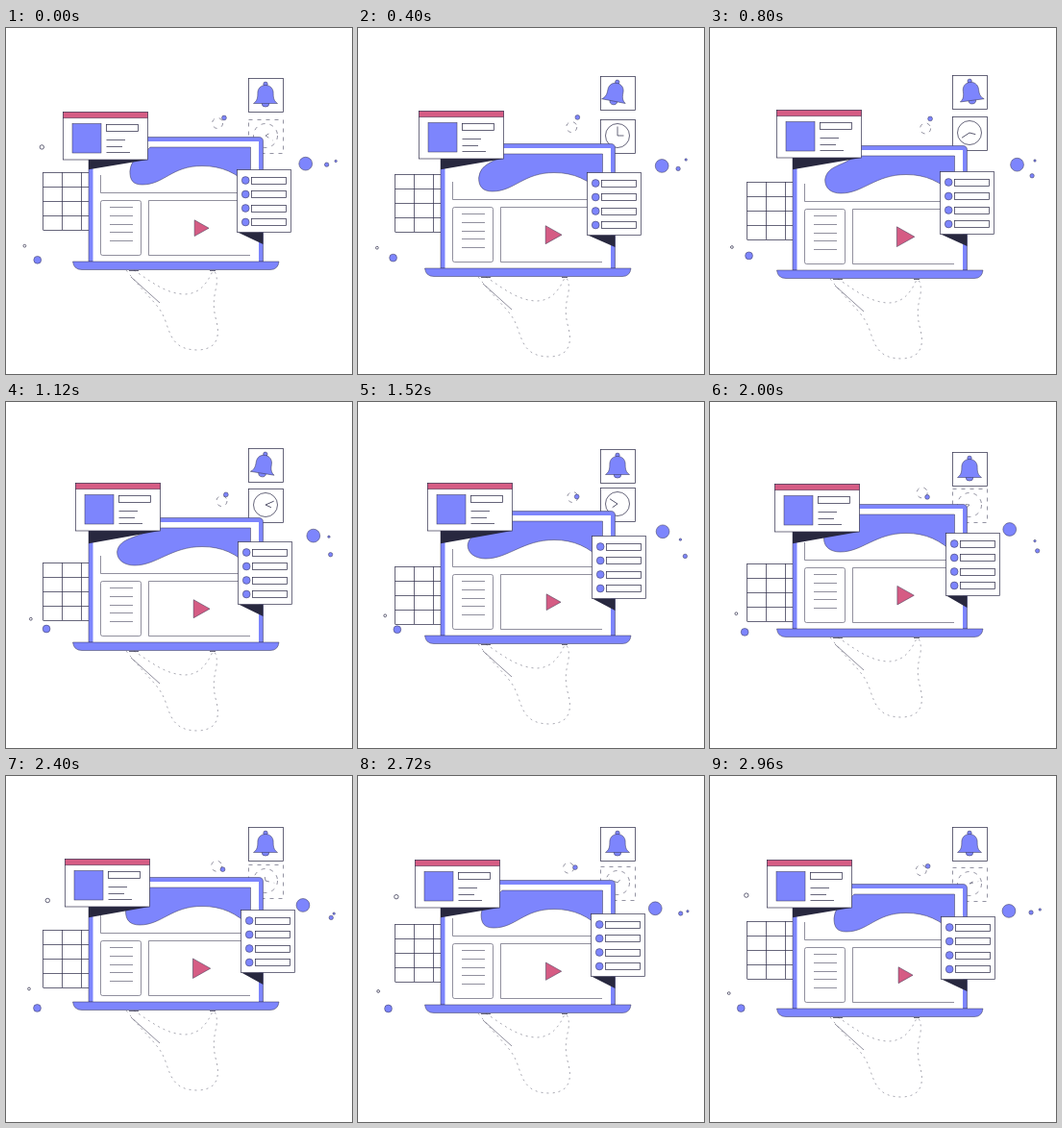
Recreate the animation shown at these times as an HTML page. Size 360 px wide and 360 px high, loop 3040 ms.

```html
<!DOCTYPE html>
<html lang="en">
<head>
<meta charset="utf-8">
<title>Floating laptop</title>
<style>
  html, body { margin: 0; width: 100%; height: 100%; overflow: hidden; background: #fff; }
  svg { display: block; width: 100vw; height: 100vh; }
  .line { fill: none; stroke: #34334f; stroke-width: .75; }
  .panel { fill: #fff; stroke: #34334f; stroke-width: .7; }
  .blue { fill: #7d85fd; stroke: #34334f; stroke-width: .5; }
  .red { fill: #d55c84; stroke: #34334f; stroke-width: .5; }
  .shade { fill: #28283f; }
  .page { stroke: #55546a; stroke-width: .65; }
  .sketch { stroke: #33334a; stroke-width: .65; stroke-dasharray: 2 4; opacity: .65; }
  .faint { stroke-dasharray: 4 5; opacity: .7; }
</style>
</head>
<body>
<svg viewBox="0 0 360 360">
  <path id="grid" class="line" d="M38.5 .5H98M38.5 15.5H98M38.5 30.5H98M38.5 45.5H98M38.5 60.5H98M38.5 0V60M58.5 0V60M78.5 0V60"/>

  <g id="alarm">
    <rect class="line" x="-17.5" y=".5" width="36" height="35"/>
    <g id="bell">
      <circle class="blue" cy="6.3" r="2.2"/>
      <circle class="blue" cy="26.2" r="3.9"/>
      <path class="blue" d="M-12.5 26.5C-7 23 -8.5 17 -8 14C-7 9 -3 7.5 0 7.5C3 7.5 7 9 8 14C8.5 17 7 23 12.5 26.5Z"/>
    </g>
  </g>

  <g id="clock" class="line">
    <rect x="-17.5" y="-16.5" width="36" height="35"/>
    <circle r="12.5"/>
    <path id="minute" d="M0 0V-9.5"/>
    <path id="hour" d="M0 0V-6.5"/>
  </g>

  <!-- y = 0 is the top edge of the laptop base -->
  <g id="laptop">
    <g class="line sketch">
      <path d="M125 9C150 40 160 45 166 62C172 80 176 92 200 92C222 91 222 75 219 62C214 45 217 35 219 25C220 18 219 12 216 9"/>
      <path d="M133 9C150 20 165 33 185 34C200 34 208 25 215 10"/>
    </g>
    <path class="line page" d="M130 16L160 43"/>
    <path class="line" d="M128 9.5H138M212 9.5H218"/>
    <path class="blue" d="M86 0V-125Q86 -129.5 90.5 -129.5H263Q267.5 -129.5 267.5 -125V0Z"/>
    <path fill="#fff" d="M90.5 0V-125H263V0Z"/>
    <path id="blob" class="blue"/>
    <g class="line page">
      <path d="M98.5 -90V-71.5H254"/>
      <rect x="98.5" y="-63.5" width="42" height="57" rx="2"/>
      <path d="M254 -63.5H148.5V-6.5H254"/>
      <path d="M108 -56.5H132M108 -47.5H132M108 -38.5H132M108 -30.5H132M108 -21.5H132"/>
    </g>
    <path id="play" class="red"/>
    <path class="blue" d="M69.5 0H284Q283 8.5 275 8.5H79Q70.5 8.5 69.5 0Z"/>
  </g>

  <path id="newsShade" class="shade"/>
  <g id="news">
    <rect class="panel" x=".5" y=".5" width="88" height="49.5"/>
    <rect class="red" x=".5" y=".5" width="88" height="6.3"/>
    <rect class="blue" x="10" y="12.5" width="30" height="30.5"/>
    <rect class="line" x="45.5" y="13.5" width="33" height="7"/>
    <path class="line" d="M45.5 29.5H65M45.5 36.5H62M45.5 42.5H70"/>
  </g>

  <path id="listShade" class="shade"/>
  <g id="list"><rect class="panel" x=".5" y=".5" width="56" height="65"/></g>

  <g id="dots"></g>
</svg>
<script>
  const LOOP = 3040, STEP = 80;
  const $ = id => document.getElementById(id);
  const set = (el, name, value) => el.setAttribute(name, value);
  const move = (id, x, y) => set($(id), 'transform', `translate(${x} ${y})`);
  const turn = (id, a, cy = 0) => set($(id), 'transform', `rotate(${a} 0 ${cy})`);

  function add(parent, tag, attrs) {
    const el = document.createElementNS('http://www.w3.org/2000/svg', tag);
    for (const k in attrs) set(el, k, attrs[k]);
    return parent.appendChild(el);
  }

  // One swing per loop around mid, highest at time peak.
  const wave = (t, mid, amp, peak) => mid + amp * Math.cos(2 * Math.PI * (t - peak) / LOOP);
  // The same on whole pixels, which keeps thin outlines crisp.
  const snap = (...args) => Math.round(wave(...args));

  // Eased values between [time, value] points.
  function track(t, points) {
    for (let i = 1; i < points.length; i++) {
      const [a, from] = points[i - 1], [b, to] = points[i];
      if (t < b) return from + (to - from) * (1 - Math.cos(Math.PI * (t - a) / (b - a))) / 2;
    }
    return points[points.length - 1][1];
  }

  for (let i = 0; i < 4; i++) {
    const y = 11.5 + i * 14.5;
    add($('list'), 'circle', { class: 'blue', cx: 9.2, cy: y, r: 3.9 });
    add($('list'), 'rect', { class: 'line', x: 15.5, y: Math.floor(y - 3.5) + .5, width: 36, height: 7 });
  }

  // Radius, look, then mid / amplitude / peak time for x and y.
  const dots = [
    { r: 6.9, look: 'blue', x: [314.4, 5.6, 1000], y: [138, 5.5, 460] },
    { r: 2.2, look: 'blue', x: [337, 4, 1800], y: [151.3, 9.3, 1430] },
    { r: 1.2, look: 'blue', x: [339.3, 4, 2920], y: [140.8, 3.8, 1960] },
    { r: 3.9, look: 'blue', x: [36.8, 5.3, 1180], y: [239, 3, 2700] },
    { r: 1.4, look: 'line', x: [23.8, 4.6, 1660], y: [224.5, 4.3, 500] },
    { r: 2.2, look: 'line', x: [42, 5.3, 1760], y: [130.6, 6.7, 1560], hide: [320, 2160] },
    { r: 5.5, look: 'line faint', x: [221.7, 2.8, 1060], y: [99, 5.5, 760] },
    { r: 2.4, look: 'blue', x: [227.3, 1.8, 860], y: [96, 3.1, 1820] }
  ];
  for (const d of dots) d.el = add($('dots'), 'circle', { class: d.look, r: d.r });

  const swing = [[0, 0], [400, 11], [760, -8], [1120, 9], [1520, 0]];
  const hours = [[0, 60], [400, 90], [1120, 115], [1520, 235], [LOOP, 420]];

  function draw(t) {
    move('grid', 0, snap(t, 160.8, 10.7, 1600));
    move('laptop', 0, snap(t, 243.3, 8.6, 760));

    const left = wave(t, 121.5, 7.5, 2960), low = 134 + (left - 116) * .6;
    set($('blob'), 'd', `M150 -119C140 -108 ${left + 2} -110 ${left} -94` +
      `C${left} -85 ${low - 10} -80 ${low} -80` +
      `C${low + 23} -80 172 -99.5 204 -99.5C225 -99.5 240 -92 254.5 -78V-119Z`);

    const half = 9.4 - Math.cos(4 * Math.PI * t / LOOP);
    const px = 203.5 - half * .88;
    set($('play'), 'd', `M${px} ${-34.8 - half}V${-34.8 + half}L${px + half * 1.78} -34.8Z`);

    const nx = snap(t, 65.7, 7, 1320), ny = snap(t, 85.5, 1.5, 2840), nb = ny + 50;
    move('news', nx, ny);
    set($('newsShade'), 'd', `M86 ${nb}H${nx + 88.5}L86 147.3Z`);

    const lx = snap(t, 241.4, 3.4, 2000), ly = snap(t, 143.3, 7, 480), lb = ly + 65.5;
    move('list', lx, ly);
    set($('listShade'), 'd', `M${lx + 1} ${lb}H267.5V${lb + 12.5}Z`);

    move('alarm', 270, snap(t, 50.8, 2.7, 2600));
    turn('bell', track(t, swing), 5);

    move('clock', 270, snap(t, 108.9, 3.3, 80) + 3 - 3);
    turn('minute', 1800 * (t - 400) / LOOP);
    turn('hour', track(t, hours));
    $('clock').classList.toggle('faint', t < 320 || t >= 1680);

    for (const d of dots) {
      set(d.el, 'cx', wave(t, ...d.x));
      set(d.el, 'cy', wave(t, ...d.y));
      if (d.hide) set(d.el, 'visibility', t >= d.hide[0] && t < d.hide[1] ? 'hidden' : 'visible');
    }
  }

  const start = performance.now();
  function frame() {
    const t = (performance.now() - start) % LOOP;
    draw(Math.floor(t / STEP) * STEP);
    requestAnimationFrame(frame);
  }
  frame();
</script>
</body>
</html>
```
